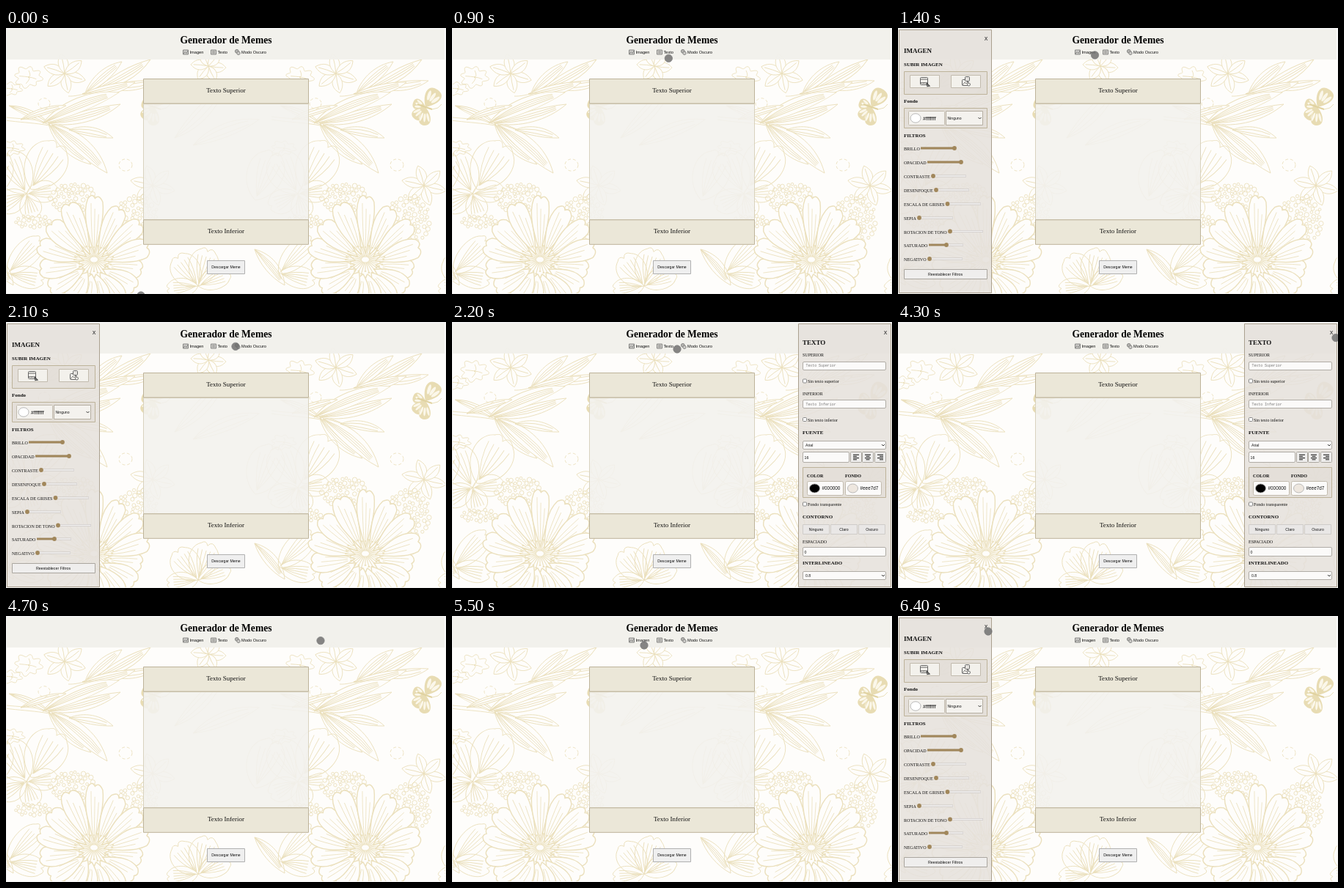
Recreate the animation shown at these times as an HTML page with a canvas. Size 600 px wide and 363 px high, loop 6600 ms.

```html
<!DOCTYPE html>
<html lang="es">
<head>
<meta charset="utf-8">
<title>Generador de Memes</title>
<style>
html, body { margin: 0; width: 100%; height: 100%; overflow: hidden; background: #fff; }
canvas { display: block; width: 600px; height: 363px; }
</style>
</head>
<body>
<canvas id="stage"></canvas>
<script>
const W = 600, H = 363, LOOP = 6600, STEP = 100, TILE = 370;
const SERIF = '"Liberation Serif", serif', SANS = '"Liberation Sans", sans-serif', MONO = '"Liberation Mono", monospace';
const TAU = Math.PI * 2, GOLD = '#ebe0bd', PAPER = '#fefdfb', BROWN = '#a1875b', EDGE = '#bdb39a';
const dpr = window.devicePixelRatio || 1;
let g;

function setup(canvas) {
  canvas.width = W * dpr;
  canvas.height = H * dpr;
  const ctx = canvas.getContext('2d');
  ctx.scale(dpr, dpr);
  return ctx;
}

function layer(paint) {
  const canvas = document.createElement('canvas');
  g = setup(canvas);
  paint();
  return canvas;
}

// ---- basic shapes ----
function box(x, y, w, h, fill, stroke, r = 0) {
  g.beginPath();
  g.roundRect(x + .5, y + .5, w - 1, h - 1, r);
  if (fill) { g.fillStyle = fill; g.fill(); }
  if (stroke) { g.strokeStyle = stroke; g.lineWidth = 1; g.stroke(); }
}

function oval(x, y, rx, ry, fill, stroke) {
  g.beginPath();
  g.ellipse(x, y, rx, ry, 0, 0, TAU);
  if (fill) { g.fillStyle = fill; g.fill(); }
  if (stroke) { g.strokeStyle = stroke; g.stroke(); }
}

function line(color, width, ...pts) {
  g.beginPath();
  for (let i = 0; i < pts.length; i += 2) g.lineTo(pts[i], pts[i + 1]);
  g.strokeStyle = color;
  g.lineWidth = width;
  g.stroke();
}

function text(s, x, y, size, { font = SERIF, bold = false, color = '#111', align = 'left' } = {}) {
  g.font = (bold ? 'bold ' : '') + size + 'px ' + font;
  g.fillStyle = color;
  g.textAlign = align;
  g.fillText(s, x, y);
}
const head = (s, x, y, size = 6.9) => text(s, x, y, size, { bold: true });
const sans = (s, x, y, size = 5.2, align = 'left') => text(s, x, y, size, { font: SANS, align });
const chevron = (x, y) => line('#222', .9, x - 2, y - 1, x, y + 1, x + 2, y - 1);

// ---- floral wallpaper ----
function random(seed) {
  return () => (seed = (seed * 16807) % 2147483647) / 2147483647;
}

function at(x, y, angle, paint) {
  g.save();
  g.translate(x, y);
  g.rotate(angle);
  paint();
  g.restore();
}

// Leaf whose veins run along its length.
function leaf(x0, y0, x1, y1, w, bend = 0, veins = 2) {
  const len = Math.hypot(x1 - x0, y1 - y0);
  at(x0, y0, Math.atan2(y1 - y0, x1 - x0), () => {
    g.beginPath();
    g.moveTo(0, 0);
    g.bezierCurveTo(len * .3, bend - w, len * .7, bend - w, len, 0);
    g.bezierCurveTo(len * .7, bend + w, len * .3, bend + w, 0, 0);
    g.fillStyle = PAPER;
    g.fill();
    for (let k = 0; k < veins; k++) {
      const side = veins > 1 ? k / (veins - 1) - .5 : 0;
      g.moveTo(0, 0);
      g.quadraticCurveTo(len * .45, bend * 1.2 + w * side, len * .85, bend * .3 + w * side * .4);
    }
    g.stroke();
  });
}

function star(x, y, r, count, turn) {
  for (let i = 0; i < count; i++) {
    const a = turn + i * TAU / count;
    leaf(x, y, x + Math.cos(a) * r, y + Math.sin(a) * r * .9, 9, 1, 1);
  }
}

function fan(x, y, angle, len, w) {
  at(x, y, angle, () => {
    g.beginPath();
    g.moveTo(0, 0);
    g.bezierCurveTo(len * .2, -w, len * .8, -w * 1.1, len * .96, -w * .4);
    g.quadraticCurveTo(len * 1.08, -w * .15, len * .93, 0);
    g.quadraticCurveTo(len * 1.1, w * .2, len * .92, w * .5);
    g.bezierCurveTo(len * .75, w, len * .2, w * .9, 0, 0);
    for (let k = -2; k <= 2; k++) {
      g.moveTo(len * .08, 0);
      g.quadraticCurveTo(len * .45, k * w * .22, len * .8, k * w * .24);
    }
    g.stroke();
  });
}

function ruffle(x, y, rx, ry, waves) {
  g.beginPath();
  for (let i = 0; i <= 80; i++) {
    const a = i / 80 * TAU, k = 1 + .16 * Math.sin(a * waves) + .08 * Math.cos(a * 3);
    g.lineTo(x + Math.cos(a) * rx * k, y + Math.sin(a) * ry * k);
  }
  for (let i = 0; i < 4; i++) {
    const a = i * 1.5 + .3;
    g.moveTo(x, y);
    g.quadraticCurveTo(x + rx * .3, y, x + Math.cos(a) * rx * .7, y + Math.sin(a) * ry * .7);
  }
  g.stroke();
}

function bubbles(x, y, rx, ry, count, seed) {
  const rnd = random(seed), placed = [];
  for (let tries = 0; placed.length < count && tries < 900; tries++) {
    const a = rnd() * TAU, d = Math.sqrt(rnd()), r = 1.8 + rnd() * 1.5;
    const px = x + Math.cos(a) * d * rx, py = y + Math.sin(a) * d * ry;
    if (placed.some(p => Math.hypot(p.px - px, p.py - py) < p.r + r + .3)) continue;
    placed.push({ px, py, r });
    oval(px, py, r, r, null, GOLD);
  }
}

function bloomPetal(len, w) {
  g.beginPath();
  g.moveTo(14, 0);
  g.bezierCurveTo(len * .45, -w * .7, len * .72, -w * 1.3, len * .94, -w * .75);
  g.quadraticCurveTo(len * 1.04, -w * .3, len * .95, 0);
  g.quadraticCurveTo(len * 1.02, w * .4, len * .9, w * .8);
  g.bezierCurveTo(len * .7, w, len * .45, w * .6, 14, 0);
  g.fillStyle = PAPER;
  g.fill();
  g.lineWidth = 1.4;
  g.stroke();
  for (let k = -1; k <= 1; k++) {
    g.beginPath();
    g.moveTo(24, k * 2);
    g.quadraticCurveTo(len * .5, k * w * .35, len * (.8 - .08 * k), k * w * .4);
    g.lineWidth = .8;
    g.stroke();
  }
}

// The flower is seen from below: tall petals above, short ones in front.
function bloom(x, y) {
  const rnd = random(71), count = 15;
  for (let i = 0; i < count; i++) {
    const a = i * TAU / count + .12;
    const len = 69 - 17 * Math.sin(a) + rnd() * 10, w = 13 + rnd() * 4;
    at(x, y, a, () => bloomPetal(len, w));
  }
  g.save();
  g.translate(x, y - 6);
  g.scale(1, .72);
  for (let i = 0; i < 32; i++) {
    at(0, 0, i * TAU / 32, () => {
      const r = 18 + rnd() * 9;
      line(GOLD, 1.1, 5, 0, r, 0);
      oval(r + 1, 0, 1.5, 1.5, GOLD);
    });
  }
  g.restore();
}

function wing(angle, len, w) {
  at(0, 0, angle, () => {
    g.beginPath();
    g.moveTo(0, 0);
    g.bezierCurveTo(len * .4, -w, len, -w * 1.2, len, 0);
    g.bezierCurveTo(len, w, len * .5, w, 0, 0);
    g.fillStyle = '#e8dcb3';
    g.fill();
    for (let k = -1; k <= 1; k++) at(0, 0, k * .32, () => oval(len * .58, 0, len * .24, w * .16, '#fbf7ea'));
  });
}

function butterfly(x, y) {
  at(x, y, 0, () => {
    wing(-.95, 29, 14);
    wing(-2.75, 18, 9);
    wing(2.4, 22, 10);
    wing(1.65, 25, 10);
    line('#e0d2a0', 2, -11, -4, 9, 3);
    line('#e0d2a0', .7, 9, 3, 17, 1, 22, -4);
  });
}

function dashedRing(x, y, r) {
  g.setLineDash([4, 3]);
  oval(x, y, r, r * .9, null, GOLD);
  g.setLineDash([]);
}

function stem(...c) {
  g.beginPath();
  g.moveTo(c[0], c[1]);
  g.bezierCurveTo(...c.slice(2));
  g.stroke();
}

function tile() {
  g.strokeStyle = GOLD;
  g.lineWidth = .9;
  star(80, 62, 30, 6, .35);
  star(200, 215, 31, 6, .25);
  star(276, 52, 24, 6, .1);
  ruffle(30, 67, 17, 13, 8);
  ruffle(7, 83, 13, 8, 7);
  ruffle(8, 164, 15, 9, 8);
  // upper spray
  stem(85, 93, 100, 94, 130, 84, 160, 68);
  leaf(136, 80, 206, 72, 8, 4);
  leaf(122, 85, 197, 43, 10, 3, 3);
  leaf(108, 89, 158, 46, 10, -2, 3);
  leaf(104, 90, 176, 74, 9, 3, 3);
  // large spray
  stem(-8, 121, 30, 126, 60, 122, 100, 144);
  stem(-8, 125, 30, 131, 60, 128, 96, 145);
  leaf(4, 106, 60, 132, 6, -3);
  leaf(58, 130, 156, 104, 10, 5, 3);
  leaf(50, 130, 154, 88, 13, -6, 4);
  leaf(58, 131, 116, 186, 9, 6, 3);
  leaf(62, 132, 138, 198, 14, -7, 4);
  leaf(86, 139, 146, 150, 8, -4);
  leaf(20, 125, 82, 106, 6, -2);
  dashedRing(52, 103, 8);
  dashedRing(163, 187, 9);
  // broad veined petals
  fan(34, 220, -1.02, 72, 34);
  fan(28, 226, -2.05, 62, 30);
  fan(28, 226, -.1, 42, 18);
  fan(28, 226, 2.7, 42, 20);
  fan(28, 226, 1.3, 34, 18);
  fan(262, 352, -2.2, 50, 24);
  fan(262, 352, -1.3, 52, 24);
  fan(262, 352, -.4, 46, 18);
  fan(262, 352, 3.05, 42, 16);
  leaf(339, 302, 380, 351, 11, -3, 4);
  fan(340, 235, -1.2, 70, 30);
  leaf(230, 150, 300, 75, 12, 5);
  leaf(255, 160, 345, 125, 12, -4);
  bubbles(92, 232, 32, 20, 66, 19);
  bubbles(178, 262, 30, 34, 90, 47);
  bubbles(36, 264, 24, 9, 30, 83);
  fan(2, 335, -.8, 66, 20);
  fan(2, 335, .2, 50, 18);
  g.strokeStyle = GOLD;
  bloom(120, 322);
  butterfly(202, 108);
}

function page() {
  g.fillStyle = '#f4f4f3';
  g.fillRect(0, 0, W, H);
  g.save();
  g.beginPath();
  g.rect(1, 2, 598, 360);
  g.clip();
  g.fillStyle = PAPER;
  g.fillRect(0, 0, W, H);
  for (const x of [-TILE, 0, TILE]) at(x, 0, 0, tile);
  g.restore();

  g.fillStyle = 'rgba(242,241,236,.96)';
  g.fillRect(1, 2, 597, 41);
  text('Generador de Memes', 300, 20.5, 13.55, { bold: true, color: '#000', align: 'center' });
  sans('Imagen', 250.5, 35.3, 5.65);
  sans('Texto', 288.5, 35.3, 5.65);
  sans('Modo Oscuro', 321, 35.3, 5.65);
  navIcons();

  box(187, 103, 226, 159, 'rgba(243,242,238,.88)', '#d8d2be');
  box(187, 69, 226, 34.5, '#ebe7d8', EDGE);
  box(187, 261.3, 226, 34.5, '#ebe7d8', EDGE);
  text('Texto Superior', 300, 88.3, 9, { align: 'center' });
  text('Texto Inferior', 300, 280.3, 9, { align: 'center' });
  box(274, 317, 52, 19, '#efefef', '#b0b0b0');
  sans('Descargar Meme', 300, 328, 5.15, 'center');
}

function navIcons() {
  const c = '#858583';
  box(241, 29.5, 8, 7, '#cfcecb', c);
  line(c, 1, 242, 35.5, 244, 32.5, 246, 34.5, 248, 31);
  box(279, 29.5, 8, 7, '#d6d5d1', c);
  line(c, 1, 281, 32, 285, 32);
  line(c, 1, 281, 34, 285, 34);
  oval(314.8, 31.8, 2.4, 2.4, '#b5b4b1', c);
  oval(317, 34.3, 2.2, 2.2, '#cfcecb', c);
}

// ---- side panels ----
function panel(x) {
  box(x, 2, 127, 360, 'rgba(230,226,221,.87)', '#aaa08f');
  text('X', x + 119, 17, 7, { font: SANS, bold: true, color: '#555', align: 'center' });
}

function slider(label, y, start, end, knob) {
  text(label, 8, y + 3, 6.05);
  line('#c9c5c4', 2.8, start, y, end, y);
  line('#f6f4f3', 1.7, start + .5, y, end - .5, y);
  if (knob > start + 1) line(BROWN, 2.8, start, y, knob, y);
  oval(knob, y, 2.9, 2.9, BROWN);
}

function imagePanel() {
  panel(1);
  head('IMAGEN', 8, 34, 9);
  head('SUBIR IMAGEN', 8, 52.3, 7);
  box(8, 59, 114, 32, 'rgba(226,221,213,.6)', EDGE);
  box(16, 64, 41, 18, '#f3f1ec', '#c2bbae');
  box(72, 64, 41, 18, '#f3f1ec', '#c2bbae');
  box(30, 67, 11, 11, '#f3f1ec', '#666', 1);
  line('#666', 1, 30, 70, 41, 70);
  text('www', 35.5, 75.5, 4.2, { font: SANS, bold: true, color: '#444', align: 'center' });
  line('#444', 1.2, 39, 75, 43, 79, 40, 79.5, 39, 75);
  box(87, 70, 9, 9, '#f3f1ec', '#666', 1);
  box(91, 66, 7, 7, '#e3e1dd', '#666', 1);
  line('#666', .8, 88, 78, 91, 74, 93, 76, 95, 73);
  oval(96.5, 77, 2, 2, '#f3f1ec', '#555');

  head('Fondo', 8, 102, 7);
  box(8, 109, 114, 28, 'rgba(226,221,213,.6)', EDGE);
  box(14, 113, 50, 20, '#f4f2ee', '#c2bbae', 1);
  g.lineWidth = .8;
  oval(24, 123, 7, 6.2, '#fff', '#aaa');
  sans('#fffffff', 34, 125.5, 7.4);
  box(65, 113, 51, 20, '#f4f2ee', '#b5aea2');
  sans('Ninguno', 67.5, 125, 5.1);
  chevron(111.5, 123);

  head('FILTROS', 8, 149, 6.9);
  slider('BRILLO', 164, 31, 79, 77);
  slider('OPACIDAD', 183, 40, 86, 86);
  slider('CONTRASTE', 202, 47, 93, 48);
  slider('DESENFOQUE', 221, 51, 97, 52);
  slider('ESCALA DE GRISES', 240, 67, 113, 67.5);
  slider('SEPIA', 259, 28, 75, 29);
  slider('ROTACION DE TONO', 277.5, 70, 116, 71);
  slider('SATURADO', 296, 42, 89, 66);
  slider('NEGATIVO', 315, 42, 88, 43);
  box(8, 329, 114, 14, '#efeeed', '#aaa69f');
  sans('Reestablecer Filtros', 64.5, 338, 5.3, 'center');
}

const field = (y, h, w = 114) => box(478, y, w, h, '#fbfaf9', '#b0aca6', 1.5);

function check(label, y) {
  box(478, y - 5.5, 6, 6, '#fff', '#888', 1);
  text(label, 485, y, 6);
}

function swatch(x, color, code) {
  box(x, 217, 50, 20, '#fbfaf9', '#c2bbae', 2);
  g.lineWidth = .8;
  oval(x + 10.5, 227, 7, 6, color, '#aaa');
  sans(code, x + 20.5, 229.4, 6.4);
}

function alignButton(x, side) {
  box(x, 177, 16, 15, '#efeeed', '#aaa69f', 1);
  for (let i = 0; i < 4; i++) {
    const w = i % 2 ? 5 : 8, left = x + 4 + (8 - w) * side;
    line('#222', 1.1, left, 181.2 + i * 2.2, left + w, 181.2 + i * 2.2);
  }
}

function textPanel() {
  panel(472);
  head('TEXTO', 478, 31.3, 9);
  text('SUPERIOR', 478, 47, 6);
  field(54, 12);
  text('Texto Superior', 482.5, 61.3, 4.9, { font: MONO, color: '#777' });
  check('Sin texto superior', 83);
  text('INFERIOR', 478, 100, 6);
  field(106, 12);
  text('Texto Inferior', 482.5, 113.6, 4.9, { font: MONO, color: '#777' });
  check('Sin texto inferior', 135.5);

  head('FUENTE', 478, 153, 7);
  field(162, 12);
  sans('Arial', 482, 169.8);
  chevron(588, 168);
  field(177, 15, 64);
  sans('16', 480.5, 186.7);
  [543, 559, 576].forEach((x, i) => alignButton(x, i / 2));

  box(478, 198, 114, 42, 'rgba(226,221,213,.6)', EDGE);
  head('COLOR', 484, 212, 6.1);
  head('FONDO', 536, 212, 6.1);
  swatch(484, '#000', '#000000');
  swatch(536, '#eee7df', '#eee7d7');
  check('Fondo transparente', 251);

  head('CONTORNO', 478, 268, 7);
  ['Ninguno', 'Claro', 'Oscuro'].forEach((label, i) => {
    box(478 + i * 38, 276, 37, 14, '#e9e7e6', '#cfccc9');
    sans(label, 496.5 + i * 38, 284.8, 5.2, 'center');
  });
  text('ESPACIADO', 478, 301.5, 6);
  field(307, 13);
  sans('0', 480.5, 315.7);
  head('INTERLINEADO', 478, 330.6, 6.9);
  field(340, 12);
  sans('0.8', 482, 347.9);
  chevron(588, 346);
}

// ---- motion: time, x, y ----
const path = [
  [0, 184, 365], [300, 245, 235], [600, 315, 75], [800, 308, 43], [1100, 270, 38],
  [1400, 268.5, 37], [1600, 285, 32], [1900, 325, 26], [2200, 307, 37], [2900, 309, 39],
  [3500, 345, 42], [4000, 540, 28], [4200, 597, 22], [4400, 597, 21], [4900, 317, 42],
  [5200, 280, 42], [5500, 262, 40], [5800, 250, 38], [6300, 121, 18], [6400, 123, 21], [6600, 123, 21]
];

function pointer(t) {
  const i = path.findIndex((p, n) => n && t <= p[0]);
  const [t0, x0, y0] = path[i - 1], [t1, x1, y1] = path[i];
  const k = (t - t0) / (t1 - t0);
  return [x0 + (x1 - x0) * k, y0 + (y1 - y0) * k];
}

const backdrop = layer(page);
const screen = setup(document.getElementById('stage'));

function draw(now) {
  const t = Math.min(Math.floor((now % LOOP) / STEP) * STEP, 6400);
  g = screen;
  g.drawImage(backdrop, 0, 0, W, H);
  if ((t >= 1100 && t < 2200) || t >= 5600) imagePanel();
  else if (t >= 2200 && t < 4500) textPanel();
  const [x, y] = pointer(t);
  g.lineWidth = 1;
  oval(x, y, 5.2, 5.2, 'rgba(105,105,105,.8)', 'rgba(125,125,125,.7)');
}

const start = performance.now();
function tick() {
  draw(performance.now() - start);
  requestAnimationFrame(tick);
}
tick();
</script>
</body>
</html>
```
